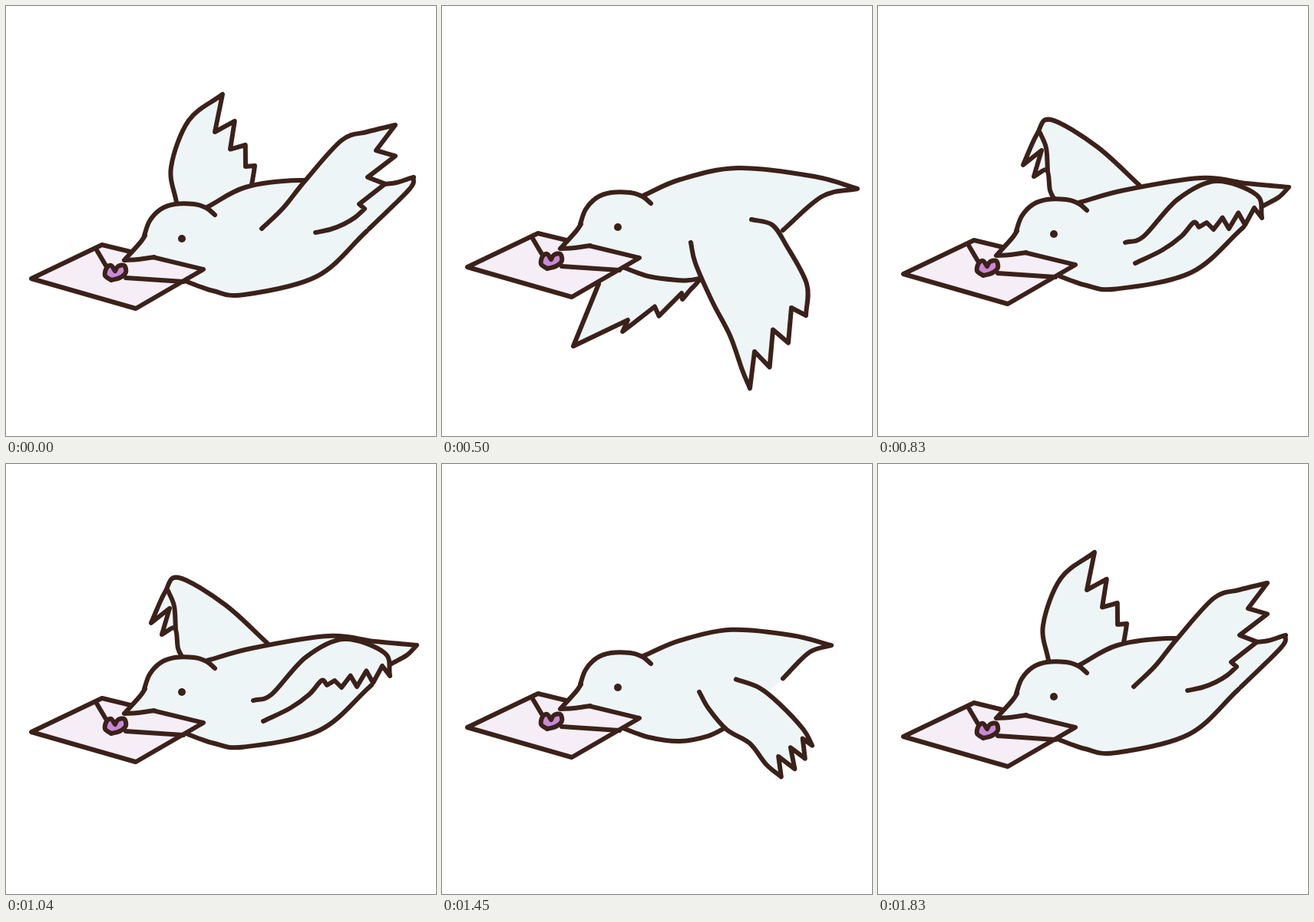
Write an HTML page that moves like this. It is 560x560 px and loops after 1.91 s.

```html
<!DOCTYPE html>
<html lang="en">
<head>
<meta charset="utf-8">
<title>Dove with a letter</title>
<style>
  html, body { margin: 0; width: 100%; height: 100%; overflow: hidden; background: #fff; }
  svg { display: block; width: 100%; height: 100%; }
  g { stroke: #3b2119; stroke-width: 6; stroke-linecap: round; stroke-linejoin: round; }
</style>
</head>
<body>
<svg viewBox="0 0 560 560"><g id="bird"></g></svg>
<script>
const FEATHER = '#eef5f7', PAPER = '#f5eef6', SEAL = '#c88ad6', INK = '#3b2119';

const points = text => text.trim().split(/\s+/).map(t => t.split(',').map(Number));
const groups = text => text.split('|').map(points);
const sharp = ([x, y]) => [x, y, true];

// Blends numbers, or nested lists of them.
const mix = (a, b, t) => Array.isArray(a) ? a.map((v, i) => mix(v, b[i], t)) : a + (b - a) * t;

// Smooth curve through points; a sharp point keeps its corner.
function curve(pts, start = 'M') {
  const handle = (a, b, before) => {
    const from = a[2] || !before ? a : before;
    const k = from === a ? 3 : 6;
    return [0, 1].map(i => (a[i] + (b[i] - from[i]) / k).toFixed(1)).join(' ');
  };
  return pts.reduce((d, b, i) => {
    if (!i) return start + b[0] + ' ' + b[1];
    const a = pts[i - 1];
    return `${d}C${handle(a, b, pts[i - 2])} ${handle(b, a, pts[i + 1])} ${b[0]} ${b[1]}`;
  }, '');
}

const path = (d, fill = 'none', extra = '') => `<path d="${d}" fill="${fill}" ${extra}/>`;

// A wing: leading edge, a row of feather tips, trailing edge.
// Tips follow a parabola through three points, notches a straight line.
const wing = (count, text) => [count, ...groups(text)];

function wingCurve([count, lead, [first, middle, last], [notchA, notchB], trail]) {
  const n = Math.round(count), row = [];
  for (let k = 0; k < n; k++) {
    const t = k / (n - 1);
    const at = i => first[i] * (1 - t) * (1 - 2 * t) + middle[i] * 4 * t * (1 - t) + last[i] * t * (2 * t - 1);
    row.push([at(0), at(1)]);
    if (k < n - 1) row.push(mix(notchA, notchB, k / Math.max(1, n - 2)));
  }
  return curve([...lead, ...row.map(sharp), ...trail]);
}

// Key poses. torso: back up to the tail tip | under the tail | hidden hip | rump
const raised = {
  far: wing(4, '222,256 215,210 238,149 | 282,115 305,166 324,208 | 272,164 312,209 | 323,215 322,221 321,227 320,232'),
  near: wing(4, '333,290 361,263 390,227 437,175 470,164 | 507,155 502,214 467,264 | 482,188 460,258 | 455,275 440,284 422,291 403,295'),
  torso: groups('312,236 382,227 490,232 531,223 | 525,239 473,290 | 470,293 | 470,293 405,352')
};
const flick = {
  far: wing(2, '217,248 215,218 221,184 | 200,167 209,155 224,152 | 217,171 217,171 | 257,174 285,185 311,207 323,235'),
  near: wing(4, '361,271 388,281 415,255 460,211 495,198 | 537,196 531,241 501,282 | 511,220 504,275 | 460,307 420,316 375,307 336,286'),
  torso: groups('312,238 360,227 390,226 428,232 | 438,240 444,250 | 446,300 | 446,318 403,348'),
  crease: points('455,257 437,279 412,291')
};
const lowest = {
  far: wing(4, '204,362 193,389 182,416 | 171,443 261,414 313,382 | 242,409 312,374 | 319,375 324,369 330,363 335,357'),
  near: wing(4, '324,308 330,335 352,385 375,429 391,474 | 401,498 439,455 474,403 | 407,450 455,393 | 475,362 448,311 430,285 403,278'),
  torso: groups('310,226 385,211 485,222 541,238 | 495,248 444,292 | 400,310 | 335,355 322,357')
};
const curl = {
  far: wing(2, '195,374 203,382 215,388 | 230,390 246,391 262,389 | 246,391 246,391 | 280,386 295,380 308,373 322,362'),
  near: wing(3, '321,310 338,360 368,386 395,386 413,392 | 421,408 462,401 484,399 | 452,384 475,394 | 505,348 472,328 393,353 348,316'),
  torso: groups('310,230 400,216 480,223 542,241 | 492,258 425,323 | 400,352 | 335,358 322,361'),
  crease: points('402,311 412,323 434,334')
};
const droop = {
  far: wing(2, '236,250 229,243 222,240 | 206,245 196,238 187,230 | 217,225 217,225 | 206,197 234,175 292,190 330,228'),
  near: wing(4, '318,312 350,307 405,264 465,254 504,288 | 491,348 451,367 402,377 | 488,338 430,350 | 400,343 399,322 396,309 387,303'),
  torso: groups('304,237 400,218 485,231 543,247 | 518,252 488,262 | 440,300 | 400,345 368,359'),
  crease: points('320,340 342,340 395,311'),
  fold: points('223,238 223,207 220,183')
};
const rising = {
  far: wing(2, '231,254 224,240 220,214 | 203,222 196,214 189,207 | 213,188 213,188 | 207,167 225,148 285,183 340,233'),
  near: wing(5, '322,308 346,300 390,252 440,228 493,246 | 500,276 457,290 418,288 | 490,263 428,282 | 411,282 395,300 370,318 335,335'),
  torso: groups('320,240 420,224 480,231 535,236 | 522,249 502,260 | 480,265 | 476,288 408,347'),
  fold: points('221,215 219,185 211,165')
};

function between(a, b, t) {
  const pose = {};
  for (const part of ['far', 'near', 'torso']) pose[part] = mix(a[part], b[part], t);
  return pose;
}

// One wing beat; played forwards, then backwards.
const beat = [
  raised, between(raised, flick, .1),
  flick, between(flick, lowest, .35), between(flick, lowest, .7),
  lowest, curl, droop,
  rising, between(rising, raised, .5)
];
const TOP = beat.length - 1;

// Head, letter and belly keep their shape and only bob.
const head = points('180,299 187,280 201,265 220,258 245,258 261,263 272,272');
const beak = points('181,299 174,309 154,331 172,330 193,327');
const belly = points('310,376 270,371 233,358');
const neck = [262, 262];
const letter = 'M33 355L125 311L257 343L169 394Z';
const flap = 'M117 316L130 338M156 354L231 359';
const heart = points('142,345 146,339 154,338 156,347 148,354 137,357 129,351 131,341 137,338 142,345');
beak[2] = sharp(beak[2]);
for (const i of [0, 5, 9]) heart[i] = sharp(heart[i]);

function draw(pose, i) {
  const bob = -3 * Math.min(i, beat.length - i);
  const lift = (pts, dy = bob) => pts.map(([x, y, s]) => [x, y + dy, s]);
  const [back, under, [hip], rump] = pose.torso;
  const tail = [...back.slice(0, -1), sharp(back.at(-1)), ...under];
  const top = curve(lift(head));
  const spine = [...lift([neck]), ...tail];
  const base = [...rump, ...lift(belly, bob * 1.25)];
  const lip = lift(beak).at(-1);
  const far = wingCurve(pose.far);
  const bare = 'stroke="none"';

  return path(`${far}L270 290Z`, FEATHER, bare) + path(far) +
    (pose.fold ? path(curve(pose.fold)) : '') +
    path(`${top}${curve(spine, 'L')}L${hip}${curve(base, 'L')}L${lip[0]} ${lip[1]}Z`, FEATHER, bare) +
    path(top + curve(spine) + curve(base)) +
    path(wingCurve(pose.near), FEATHER) +
    (pose.crease ? path(curve(pose.crease), FEATHER) : '') +
    `<g transform="translate(0 ${bob})">` +
      path(letter, PAPER) + path(flap) + path(curve(heart), SEAL) + path(curve(beak), FEATHER) +
      `<circle cx="229" cy="303" r="5" fill="${INK}" ${bare}/></g>`;
}

// Drawings change about ten times a second, snapped to a 24 fps grid.
const LOOP = 1910;
const starts = Array.from({ length: 2 * TOP + 1 }, (_, k) =>
  Math.floor(Math.floor(k * 22 / 9 + .7) * 100 / 24) * 10);
const frames = beat.map(draw);
const bird = document.getElementById('bird');
let shown = -1, origin;

function show(ms) {
  const step = starts.filter(s => s <= ms).length - 1;
  const pose = TOP - Math.abs(TOP - step);
  if (pose !== shown) bird.innerHTML = frames[shown = pose];
}

function tick(now) {
  origin ??= now;
  show(Math.max(0, now - origin) % LOOP);
  requestAnimationFrame(tick);
}

show(0);
requestAnimationFrame(tick);
</script>
</body>
</html>
```
